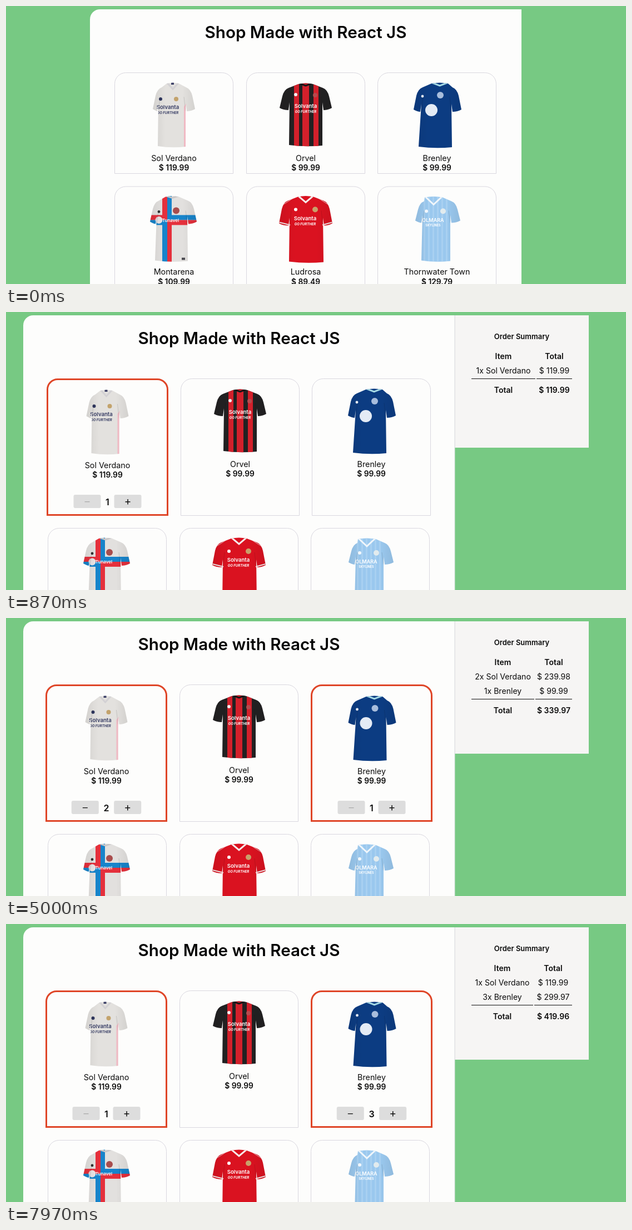
An HTML page with a canvas that plays this animation: 1115 by 502 pixels, repeating every 8 s.

```html
<!DOCTYPE html>
<html lang="en">
<head>
<meta charset="utf-8">
<title>Shop</title>
<style>
  html, body { margin: 0; width: 100%; height: 100%; overflow: hidden; background: #77c983; }
  canvas { display: block; width: 1115px; height: 502px; }
</style>
</head>
<body>
<canvas id="stage"></canvas>
<script>
const W = 1115, H = 502, LOOP = 8000;
const canvas = document.getElementById('stage');
const dpr = window.devicePixelRatio || 1;
canvas.width = Math.round(W * dpr);
canvas.height = Math.round(H * dpr);
const ctx = canvas.getContext('2d');

const FONT = 'Inter, "Open Sans", sans-serif';
const ACCENT = '#df4527';

// neck: [centre, half width, V depth]; x is measured from the card centre, y from the card top
const products = [
  { name: 'Sol Verdano', price: 119.99, art: paintWhite,
    cut: { neck: [-2, 11, 13], top: 17, out: [-38, 38], sleeve: 66, body: [-28, 21], hem: [-29, 21], bottom: 135, fill: '#e3e1de', trim: '#d3d1d4' } },
  { name: 'Orvel', price: 99.99, art: paintStriped,
    cut: { neck: [0, 13, 6], top: 18, out: [-47, 47], sleeve: 64, body: [-29, 30], hem: [-30, 30], bottom: 133, fill: '#222122', trim: '#171617' } },
  { name: 'Brenley', price: 99.99, art: paintNavy,
    cut: { neck: [5, 15, 7], top: 17, out: [-42, 44], sleeve: 67, body: [-28, 26], hem: [-33, 27], bottom: 136, fill: '#0c3c82', trim: '#a7dbe6' } },
  { name: 'Montarena', price: 109.99, art: paintCross,
    cut: { neck: [-3, 12, 5], top: 16, out: [-43, 41], sleeve: 64, body: [-31, 24], hem: [-34, 25], bottom: 136, fill: '#e2e0de', trim: '#c9c7c8' } },
  { name: 'Ludrosa', price: 89.49, art: paintRed,
    cut: { neck: [0, 14, 13], top: 16, out: [-48, 48], sleeve: 67, body: [-29, 31], hem: [-30, 32], bottom: 138, fill: '#da1220', trim: '#f6e9e9' } },
  { name: 'Thornwater Town', price: 129.79, art: paintSky,
    cut: { neck: [-6, 16, 16], top: 17, out: [-39, 42], sleeve: 62, body: [-26, 24], hem: [-28, 24], bottom: 136, fill: '#9ac8ee', trim: '#f0f6fb' } }
];

// qty: ordered pieces by product index; split: centre of the gap between the summary columns
const states = [
  { at: 0, qty: {} },
  { at: 730, qty: { 0: 1 }, split: 953 },
  { at: 2670, qty: { 0: 2 }, split: 951 },
  { at: 5000, qty: { 0: 2, 2: 1 }, split: 951 },
  { at: 6070, qty: { 0: 2, 2: 2 }, split: 950 },
  { at: 6430, qty: { 0: 2, 2: 3 }, split: 950 },
  { at: 7830, qty: { 0: 1, 2: 3 }, split: 949 }
];

const money = v => '$ ' + v.toFixed(2);

function text(str, x, y, size, weight = 400, color = '#0b0b0b', style = 'normal') {
  ctx.font = `${style} ${weight} ${size}px ${FONT}`;
  ctx.textAlign = 'center';
  ctx.textBaseline = 'alphabetic';
  ctx.fillStyle = color;
  ctx.fillText(str, x, y);
}

function rect(x, y, w, h, color) {
  ctx.fillStyle = color;
  ctx.fillRect(x, y, w, h);
}

function box(x, y, w, h, radii, fill, stroke, line = 1) {
  ctx.beginPath();
  ctx.roundRect(x, y, w, h, radii);
  if (fill) { ctx.fillStyle = fill; ctx.fill(); }
  if (stroke) { ctx.strokeStyle = stroke; ctx.lineWidth = line; ctx.stroke(); }
}

function dot(x, y, r, color) {
  ctx.beginPath();
  ctx.arc(x, y, r, 0, Math.PI * 2);
  ctx.fillStyle = color;
  ctx.fill();
}

function polyline(points, color, width) {
  ctx.beginPath();
  points.forEach(([x, y]) => ctx.lineTo(x, y));
  ctx.strokeStyle = color;
  ctx.lineWidth = width;
  ctx.stroke();
}

function sponsor(x, y, color) {
  text('Solvanta', x, y, 9.6, 600, color);
  text('GO FURTHER', x, y + 9, 6, 700, color, 'italic');
}

function paintWhite() {
  ctx.beginPath();
  ctx.moveTo(18, 62);
  ctx.lineTo(22, 56);
  ctx.lineTo(22, 136);
  ctx.lineTo(18, 136);
  ctx.fillStyle = '#f3bcc6';
  ctx.fill();
  rect(-5, 17, 5, 5, '#3b3f66');
  dot(-24, 48, 3, '#30375f');
  dot(4, 48, 4, '#c3a36c');
  sponsor(-11, 66, '#343a62');
}

function paintStriped() {
  [[-21, 9], [-6, 12], [14, 9]].forEach(([x, w]) => rect(x, 16, w, 120, '#d3202b'));
  dot(-18, 40, 3, '#f2f2f2');
  dot(17, 41, 4, '#b64a4d');
  sponsor(0, 64, '#ffffff');
}

function paintNavy() {
  dot(-26, 43, 2.4, '#eef3fb');
  dot(6, 41, 6, '#a8bddc');
  dot(-10, 68, 11, '#e4ebf5');
}

function paintCross() {
  const red = '#e5303c', blue = '#1784cb';
  rect(-21, 10, 9, 51, red);
  rect(-12, 10, 8, 51, blue);
  rect(-21, 61, 9, 80, blue);
  rect(-12, 61, 8, 80, red);
  rect(-46, 52, 34, 9, red);
  rect(-46, 61, 34, 9, blue);
  rect(-12, 52, 60, 9, blue);
  rect(-12, 61, 60, 9, red);
  dot(-27, 61, 6.5, '#e8e3e4');
  text('Tunavel', -6, 64, 8, 600, '#ffffff');
  dot(-27, 46, 2.4, '#333333');
  dot(4, 44, 6, '#a94d4d');
  rect(14, 129, 6, 4, '#47464d');
}

function paintRed() {
  polyline([[-48, 65], [-28, 70]], '#f6e9e9', 2);
  polyline([[48, 65], [30, 70]], '#f6e9e9', 2);
  polyline([[-17, 18], [-45, 36]], '#f2b9bd', 1);
  polyline([[17, 18], [45, 36]], '#f2b9bd', 1);
  dot(-18, 42, 3, '#ffffff');
  dot(17, 42, 5, '#c9a06a');
  sponsor(-1, 61, '#ffffff');
}

function paintSky() {
  for (let x = -24; x < 24; x += 8) rect(x, 17, 3, 120, 'rgba(198,226,249,.3)');
  dot(-19, 45, 3, '#f5faff');
  dot(11, 45, 5, '#e2ebee');
  text('OLMARA', -7, 64, 9, 600, '#ffffff');
  text('SKYLINES', -7, 72, 5.5, 700, '#ffffff');
}

function shirtPath({ neck: [nx, half], top, out, sleeve, body, hem, bottom }) {
  const [l, r] = out;
  ctx.beginPath();
  ctx.moveTo(nx - half, top + 3);
  ctx.quadraticCurveTo(nx, top, nx + half, top + 3);
  ctx.lineTo(r - 16, top + 10);
  ctx.quadraticCurveTo(r - 8, top + 13, r - 5, top + 25);
  ctx.lineTo(r, sleeve);
  ctx.quadraticCurveTo(r - 7, sleeve + 4, body[1] + 2, sleeve + 4);
  ctx.lineTo(body[1], sleeve - 10);
  ctx.lineTo(hem[1], bottom - 1);
  ctx.quadraticCurveTo((hem[0] + hem[1]) / 2, bottom + 2, hem[0], bottom - 2);
  ctx.lineTo(body[0], sleeve - 10);
  ctx.lineTo(body[0] - 2, sleeve + 4);
  ctx.quadraticCurveTo(l + 7, sleeve + 4, l, sleeve);
  ctx.lineTo(l + 5, top + 25);
  ctx.quadraticCurveTo(l + 8, top + 13, l + 16, top + 10);
  ctx.closePath();
}

function shirt({ cut, art }, cx, top) {
  const { neck: [nx, half, depth], out, body, sleeve } = cut;
  ctx.save();
  ctx.translate(cx, top);
  shirtPath(cut);
  ctx.fillStyle = cut.fill;
  ctx.fill();
  ctx.clip();
  art();
  const shade = ctx.createLinearGradient(out[0], 0, out[1], 0);
  shade.addColorStop(0, 'rgba(0,0,0,.07)');
  shade.addColorStop(.3, 'rgba(0,0,0,0)');
  shade.addColorStop(.7, 'rgba(0,0,0,0)');
  shade.addColorStop(1, 'rgba(0,0,0,.07)');
  rect(out[0], 0, out[1] - out[0], 150, shade);
  body.forEach((x, i) => polyline([[x, sleeve + 4], [x + (i ? -3 : 3), 44]], 'rgba(0,0,0,.13)', 1));
  polyline([[nx - half, cut.top + 1], [nx, cut.top + depth], [nx + half, cut.top + 1]], cut.trim, 3);
  ctx.restore();
}

function stepper(cx, count) {
  const half = count === 1 ? 61 : 62.7;
  box(cx - half, 330, 49, 24, 3, '#dddddd');
  box(cx + half - 49, 330, 49, 24, 3, '#dddddd');
  const minus = cx - half + 24.5, plus = cx + half - 24.5;
  rect(minus - 4.5, 342, 9, 1.3, count === 1 ? '#a9a9a9' : '#111');
  rect(plus - 4.5, 342, 9, 1.5, '#111');
  rect(plus - .7, 338, 1.5, 9.5, '#111');
  text(count, cx, 349, 16, 600);
}

function card(item, x, top, height, count) {
  const picked = count > 0;
  const width = picked ? 219 : 214;
  const cx = x + width / 2;
  if (picked) box(x + 1.5, top + 1.5, width - 3, height - 3, [18.5, 18.5, 0, 0], null, ACCENT, 3);
  else box(x + .5, top + .5, width - 1, height - 1, [20, 20, 0, 0], null, '#d9d7df');
  const y = top + (picked ? 2 : 0);
  shirt(item, cx, y);
  text(item.name, cx, y + 159.5, 14.3);
  text(money(item.price), cx, y + 177, 13.8, 600);
  if (picked) stepper(cx, count);
}

function summary({ qty, split }) {
  rect(807, 6, 241, 239, '#f6f5f4');
  rect(807, 6, 1, 239, '#e3e2e4');
  const left = (837 + split - 1) / 2, right = (split + 1 + 1018) / 2;
  const row = (a, b, y, size, weight) => {
    text(a, left, y, size, weight);
    text(b, right, y, size, weight);
  };
  text('Order Summary', 927.5, 49, 13, 600);
  row('Item', 'Total', 85, 14, 600);
  let y = 111, total = 0;
  for (const [i, n] of Object.entries(qty)) {
    const { name, price } = products[i];
    row(`${n}x ${name}`, money(n * price), y, 14.1);
    total += n * price;
    y += 26;
  }
  rect(837, y - 17 + 6, split - 1 - 837, 0, '#111');
  rect(837, y - 17, split - 1 - 837, 1, '#111');
  rect(split + 1, y - 17, 1018 - split - 1, 1, '#111');
  row('Total', money(total), y + 9, 14, 600);
}

function shop({ qty }) {
  const picks = Object.keys(qty).length;
  const open = picks > 0;
  const left = open ? 31 : 151;
  box(left, 6, 776, 520, [18, 0, 0, 0], '#fdfdfc');
  text('Shop Made with React JS', left + 388, 57.5, 29.6, 600, '#050505');

  products.forEach((item, i) => {
    const first = i < 3, col = i % 3;
    // a thicker border widens the row, which stays centred
    const extra = first ? picks * 2.2 : 0;
    const before = first && col > 0 && qty[0] ? 4.5 : 0;
    const x = Math.round(left + 44.3 + col * 236.3 - extra + before);
    if (first) card(item, x, 120, open ? 248 : 183, qty[i] || 0);
    else card(item, x, open ? 390 : 325.5, 200, 0);
  });
  if (open) rect(806.5, 6, 1, H, '#dcdfe0');
}

function draw(t) {
  const state = states.filter(s => s.at <= t).pop();
  ctx.setTransform(dpr, 0, 0, dpr, 0, 0);
  rect(0, 0, W, H, '#77c983');
  shop(state);
  if (state.split) summary(state);
}

const start = performance.now();
function frame() {
  draw((performance.now() - start) % LOOP);
  requestAnimationFrame(frame);
}
frame();
</script>
</body>
</html>
```
